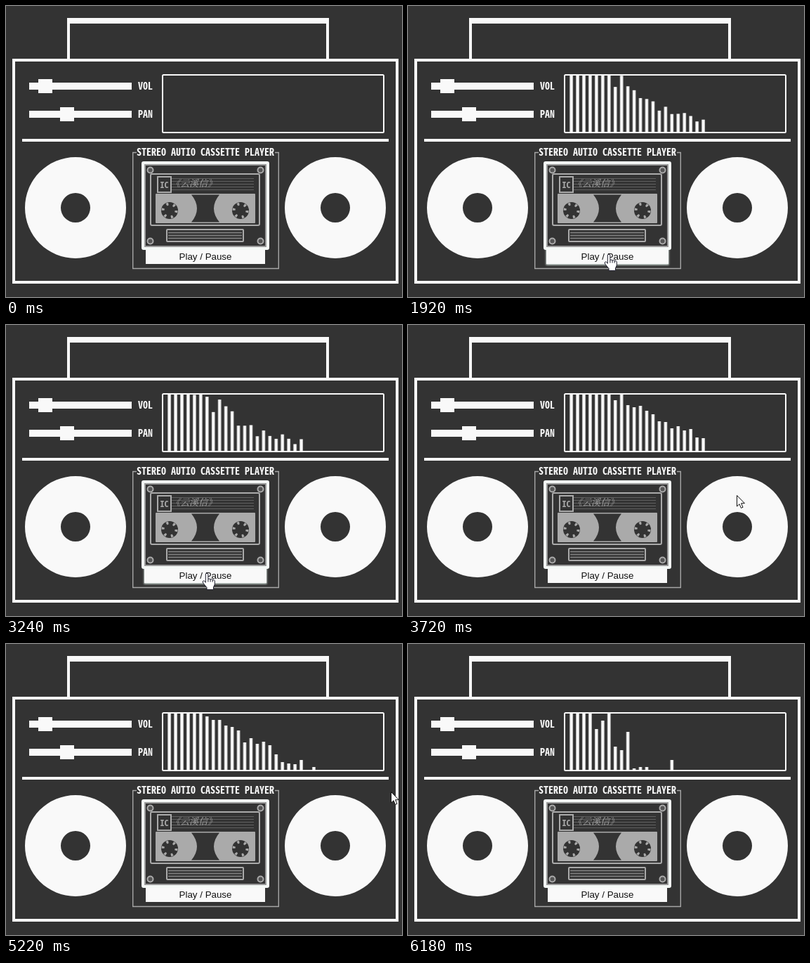
Write an HTML page that moves like this. It is 564x414 px and loops after 6240 ms.

```html
<!DOCTYPE html>
<html lang="zh">
<head>
<meta charset="utf-8">
<title>Cassette player</title>
<style>
  html, body { margin: 0; width: 100%; height: 100%; overflow: hidden; background: #333; }
  svg { display: block; }
  .label { font: bold 14px "Noto Sans Mono CJK SC", "Liberation Mono", monospace; fill: #f9f9f9; }
  .button { font: 13.333px "Liberation Sans", Arial, sans-serif; fill: #111; }
  .tape { font: italic 13px "Noto Serif CJK SC", "Noto Sans CJK SC", serif; fill: #aaa; }
  .mark { font: bold 12px "Noto Sans Mono CJK SC", "Liberation Mono", monospace; fill: #aaa; }
</style>
</head>
<body>
<svg width="564" height="414" viewBox="0 0 564 414">
  <defs>
    <linearGradient id="metal">
      <stop offset="0" stop-color="#aaa"/>
      <stop offset=".35" stop-color="#fff"/>
      <stop offset=".65" stop-color="#fff"/>
      <stop offset="1" stop-color="#aaa"/>
    </linearGradient>
    <filter id="glow" x="-10%" y="-40%" width="120%" height="180%">
      <feGaussianBlur stdDeviation="1"/>
    </filter>
    <g id="reel">
      <circle r="12" fill="#333"/>
      <circle r="9.5" fill="none" stroke="#aaa" stroke-width="4" stroke-dasharray="3 6.948"/>
    </g>
    <circle id="screw" r="4" fill="#555" stroke="#aaa" stroke-width="2"/>
    <path id="speaker" fill="#f9f9f9" fill-rule="evenodd"
      d="M-72 0a72 72 0 1 1 144 0a72 72 0 1 1-144 0ZM-21 0a21 21 0 1 0 42 0a21 21 0 1 0-42 0Z"/>
  </defs>
  <rect width="564" height="414" fill="#333"/>

  <!-- case -->
  <g fill="#f9f9f9">
    <path d="M87 17H460V75H456V25H91V75H87Z"/>
    <path fill-rule="evenodd" d="M9 75H559V395H9ZM13 79V391H555V79Z"/>
    <path d="M23 189H545V193H23Z"/>
    <path d="M33 109H179V119H33ZM33 149H179V159H33Z"/>
    <path d="M46 104H66V124H46ZM77 144H97V164H77Z"/>
  </g>
  <text class="label" x="188" y="119">VOL</text>
  <text class="label" x="188" y="159">PAN</text>
  <use href="#speaker" x="99" y="287"/>
  <use href="#speaker" x="469" y="287"/>

  <!-- equaliser -->
  <g id="bars" fill="url(#metal)"></g>
  <rect x="223" y="98" width="315" height="82" rx="1.5" fill="none" stroke="#f9f9f9" stroke-width="2"/>

  <!-- deck -->
  <path d="M186 208.5H180.7V373.5H388.3V208.5H383" fill="none" stroke="#a6a6a6" stroke-width="1.4"/>
  <text class="label" x="186" y="213">STEREO AUTIO CASSETTE PLAYER</text>
  <rect id="halo" x="196.5" y="345" width="175" height="23.5" fill="#d5e2dc" filter="url(#glow)"/>
  <rect id="key" y="345" height="22" fill="#f9f9f9"/>
  <text class="button" x="246.6" y="361">Play / Pause</text>

  <!-- cassette -->
  <rect x="195" y="223" width="178" height="122" rx="1" fill="#333" stroke="#f4f8f6" stroke-width="4"/>
  <rect x="198" y="226" width="172" height="116" fill="none" stroke="#999" stroke-width="2"/>
  <use href="#screw" x="205.5" y="233.5"/>
  <use href="#screw" x="362.5" y="233.5"/>
  <use href="#screw" x="205.5" y="334.5"/>
  <use href="#screw" x="362.5" y="334.5"/>
  <g fill="none" stroke="#aaa" stroke-width="2">
    <path d="M236 245.5H353M236 249.5H353M236 253.5H353M236 257.5H353M236 261.5H353" stroke="#606060" stroke-width="1"/>
    <rect x="206" y="239" width="155" height="73" rx="2"/>
    <rect x="216" y="243" width="19" height="22" fill="#333"/>
    <rect x="229" y="318" width="109" height="17" rx="1"/>
    <path d="M231 322.5H336M231 326.5H336M231 330.5H336" stroke="#858585" stroke-width="1.4"/>
  </g>
  <text class="mark" x="219.5" y="259">IC</text>
  <text class="tape" x="235" y="257">《云溪信》</text>
  <rect x="213" y="267" width="142" height="42" rx="1" fill="#aaa"/>
  <path d="M264 268.5Q280 288 264 307.5H304Q288 288 304 268.5Z" fill="#333"/>
  <use href="#reel" x="233" y="291"/>
  <use href="#reel" x="334" y="291"/>

  <g id="cursor" stroke-linejoin="round">
    <path id="arrow" fill="#fff" stroke="#111" d="M.5.5V16L4 12.7 6.4 18.4 9 17.3 6.6 11.7H11.4Z"/>
    <path id="hand" fill="#fff" stroke="#1c1c2c" d="M-1.7 2a1.8 1.8 0 0 1 3.6 0V8.5q1.6-1.2 3.2.4 1.8-1 3.1.7 2-.6 3.1 1.1V16L9.5 20v3.4H0V20.500L-5.300 14q-1.400-2.600.6-3.200 1.600 0 3 2.500ZM1.900 8.500v4M5.100 9v3.500M8.200 9.700v3"/>
  </g>
</svg>
<script>
const LOOP = 6240, STEP = 60, COUNT = 24, FLOOR = 179, MAX = 80;
const el = id => document.getElementById(id);

// Bar heights; values above MAX are clipped by the display.
const silent = [];
const thin = [63, 90, 84, 90, 39, 86, 69, 14, 48, 69, 32];
const loud = [110, 110, 110, 110, 100, 95, 90, 72, 90, 65, 62, 64, 57, 52, 42, 41, 32, 35, 29, 31, 19, 18];
const mid = [100, 100, 96, 90, 62, 77, 84, 42, 37, 58, 25, 19, 3, 8, 13, 0, 25, 0, 8];
const wide = [110, 110, 110, 110, 100, 90, 76, 71, 71, 63, 61, 56, 39, 45, 37, 40, 35, 22, 11, 9, 8, 14, 0, 4];
const low = [100, 96, 92, 88, 58, 70, 82, 33, 28, 54, 2, 4, 4, 0, 0, 0, 14];

const sound = [
  [1500, silent], [1740, loud], [2640, thin], [2880, mid], [3060, loud],
  [3540, thin], [3720, loud], [4440, mid], [4620, thin], [4800, loud],
  [5220, wide], [5820, thin], [6180, low]
];
const path = [
  [240, [540, 103]], [840, [286, 353]], [3360, [286, 353]], [3480, [405, 298]],
  [3720, [468, 242]], [3960, [548, 210]], [5340, [548, 210]], [5460, [557, 158]]
];

const bars = Array.from({ length: COUNT }, (_, i) => {
  const bar = document.createElementNS("http://www.w3.org/2000/svg", "rect");
  bar.setAttribute("x", 230.1 + 8.95 * i);
  bar.setAttribute("width", 5);
  return el("bars").appendChild(bar);
});

// Neighbouring keys around t and the progress between them.
function span(keys, t) {
  const last = keys.length - 1;
  if (t <= keys[0][0]) return [keys[0][1], keys[0][1], 0];
  if (t >= keys[last][0]) return [keys[last][1], keys[last][1], 0];
  const n = keys.findIndex(k => k[0] > t);
  const [t0, a] = keys[n - 1], [t1, b] = keys[n];
  return [a, b, (t - t0) / (t1 - t0)];
}

const mix = (a, b, u) => a + (b - a) * u;
const show = (node, on) => node.setAttribute("visibility", on ? "visible" : "hidden");

function drawBars(t) {
  const [a, b, u] = span(sound, t);
  bars.forEach((bar, i) => {
    let h = mix(a[i] || 0, b[i] || 0, u);
    if (h > 0) h += 6 * Math.sin(Math.PI * u) * Math.sin(i * 2.3 + t / STEP * 1.7);
    h = Math.max(0, Math.min(MAX, h));
    bar.setAttribute("y", FLOOR - h);
    bar.setAttribute("height", h);
  });
}

function drawCursor(t) {
  const [a, b, u] = span(path, t);
  const s = t < 840 ? u * u * (3 - 2 * u) : u;
  const x = mix(a[0], b[0], s), y = mix(a[1], b[1], s);
  const over = x > 199 && x < 369 && y > 346;
  const hand = over && t >= 900;
  const visible = t >= 240 && t < 5520;
  el("cursor").setAttribute("transform", `translate(${Math.round(x)} ${Math.round(y)})`);
  show(el("arrow"), visible && !hand);
  show(el("hand"), visible && hand);
  show(el("halo"), over);
  el("key").setAttribute("x", over ? 197 : 199);
  el("key").setAttribute("width", over ? 174 : 170);
}

function draw(ms) {
  const t = Math.floor(ms % LOOP / STEP) * STEP;
  drawBars(t);
  drawCursor(t);
}

const start = performance.now();
function tick() {
  draw(performance.now() - start);
  requestAnimationFrame(tick);
}
tick();
</script>
</body>
</html>
```
